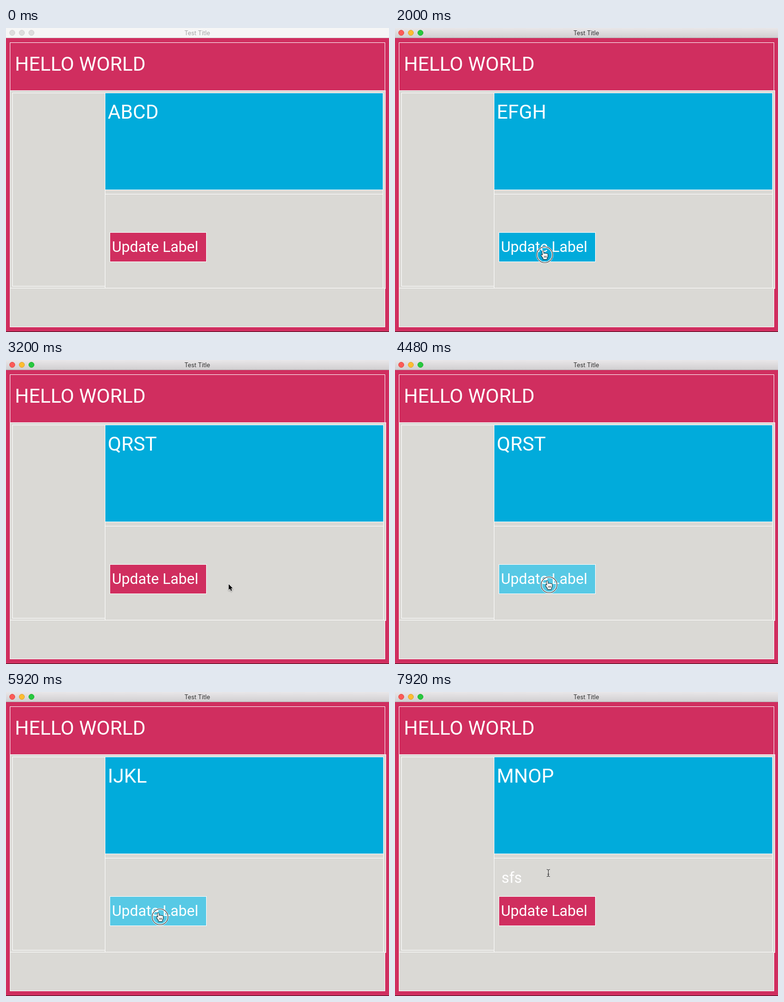
Write an HTML page with a canvas that moves like this. It is 798x634 px and loops after 8 s.

```html
<!DOCTYPE html>
<html lang="en">
<head>
<meta charset="utf-8">
<title>Test Title</title>
<style>
html, body { margin: 0; height: 100%; overflow: hidden; }
canvas { display: block; }
</style>
</head>
<body>
<canvas id="stage" width="798" height="634"></canvas>
<script>
const ctx = document.getElementById('stage').getContext('2d');
const LOOP = 8000, STEP = 80, HOLD = 2 * STEP, APPEAR = 240, FOCUS = 1040, EDIT = 6560;
const PINK = '#d02e5f', GRAY = '#dad9d5', BLUE = '#01abdb', LIGHT = '#57c9e5';
const ALPHABET = 'ABCDEFGHIJKLMNOPQRSTUVWX';

// Mouse releases on the button and elsewhere; each is held for HOLD ms before.
const updates = [1600, 2160, 2480, 2880, 4560, 4880, 5200, 5600, 6000];
const otherClicks = [1360, 7040];
const typed = [7440, 7760, 7920];

// Pointer moves: from, until, then the place reached.
const moves = [
  [APPEAR, 800, 306, 473],
  [1680, 1840, 312, 473],
  [2880, 3280, 502, 466],
  [3440, 3680, 350, 466],
  [3680, 3920, 479, 467],
  [4000, 4240, 321, 469],
  [6080, 6400, 555, 420],
  [6400, 6720, 319.5, 377.5]
];

function pointerAt(t) {
  let x = 306, y = 477;
  for (const [from, until, toX, toY] of moves) {
    const k = Math.min(1, Math.max(0, (t - from) / (until - from)));
    x += (toX - x) * k;
    y += (toY - y) * k;
  }
  return [x, y];
}

function overButton(t) {
  const [x, y] = pointerAt(t);
  return t >= FOCUS - STEP && x > 216 && x < 418 && y > 426 && y < 488;
}

const done = (times, t) => times.filter(time => t >= time).length;
const held = (times, t, span) => times.some(up => t < up && t >= up - span);

function box(x0, y0, x1, y1, fill) {
  if (fill) {
    ctx.fillStyle = fill;
    ctx.fillRect(x0, y0, x1 - x0 + 1, y1 - y0 + 1);
  }
  ctx.strokeStyle = '#fff';
  ctx.lineWidth = 1;
  ctx.strokeRect(x0 + .5, y0 + .5, x1 - x0, y1 - y0);
}

function text(str, x, y, size, color = '#fff', family = 'Roboto') {
  ctx.font = `${size}px ${family}, sans-serif`;
  ctx.fillStyle = color;
  ctx.fillText(str, x, y);
}

function dot(x, y, r, fill, stroke, width = 1) {
  ctx.beginPath();
  ctx.arc(x, y, r, 0, 7);
  if (fill) { ctx.fillStyle = fill; ctx.fill(); }
  ctx.strokeStyle = stroke;
  ctx.lineWidth = width;
  ctx.stroke();
}

function titleBar(active) {
  const g = ctx.createLinearGradient(0, 0, 0, 20);
  g.addColorStop(0, active ? '#e9e7e9' : '#f6f6f6');
  g.addColorStop(1, active ? '#d1cfd1' : '#f6f6f6');
  ctx.fillStyle = g;
  ctx.fillRect(0, 0, 798, 20);
  ctx.fillStyle = active ? '#b3b0b2' : '#d6d4d5';
  ctx.fillRect(0, 20, 798, 1);
  const lights = active
    ? [['#fc5b57', '#df4744'], ['#fdbd30', '#dea034'], ['#27c93f', '#1dad2b']]
    : Array(3).fill(['#dddddd', '#cfcfcf']);
  lights.forEach(([fill, edge], i) => dot(13 + 20 * i, 10, 5.5, fill, edge));
  ctx.textAlign = 'center';
  text('Test Title', 398.5, 15, 12.4, active ? '#303030' : '#a5a5a5', 'Inter');
  ctx.textAlign = 'left';
}

const arrow = new Path2D('M0 0V12.2L2.7 9.7L4.7 14L6.8 13L4.9 8.8H8.6Z');
const hand = new Path2D('M-2.6 1V-6.5C-2.6 -8.6 -5.4 -8.6 -5.2 -6.5L-4 1.5L-5.6 .2' +
  'C-7 -.6 -7.6 .8 -6.6 2L-3 7V9H4.4V7L6 3.5V-1.2C6 -2.6 4 -2.6 3.7 -1.4' +
  'C3.6 -3 1.4 -3 1.2 -1.8C.9 -3.4 -1.1 -3.4 -1.2 -2.2L-2.6 -3');
const fingers = new Path2D('M-1 2V6M1.2 2V6M3.3 2V6');
const beam = new Path2D('M-3.5 -7.5Q0 -7.5 0 -5V5Q0 7.5 -3.5 7.5M3.5 -7.5Q0 -7.5 0 -5V5Q0 7.5 3.5 7.5M-2 2.5H2');

function outline(shape, color, width) {
  ctx.strokeStyle = color;
  ctx.lineWidth = width;
  ctx.stroke(shape);
}

function pointer(t) {
  ctx.save();
  ctx.translate(...pointerAt(t));
  ctx.lineJoin = 'round';
  if (held([...updates, ...otherClicks], t, HOLD)) {
    dot(0, 0, 16.2, null, '#fff', 3.4);
    dot(0, 0, 16.5, null, '#1a1a1a', 1.1);
  }
  if (t >= EDIT) {
    outline(beam, 'rgba(255,255,255,.5)', 2.4);
    outline(beam, '#222', 1.1);
  } else {
    const isHand = overButton(t), shape = isHand ? hand : arrow;
    ctx.shadowColor = 'rgba(0,0,0,.35)';
    ctx.shadowBlur = 3;
    ctx.shadowOffsetY = 1.5;
    outline(shape, isHand ? '#111' : '#fff', 1.6);
    ctx.shadowColor = 'transparent';
    ctx.fillStyle = isHand ? '#fff' : '#000';
    ctx.fill(shape);
    if (isHand) outline(fingers, '#222', .9);
  }
  ctx.restore();
}

function draw(t) {
  const count = done(updates, t), first = count * 4 % ALPHABET.length;
  const right = count ? 786 : 785; // the layout widens after the first update
  const hover = overButton(t - STEP); // the button reacts one step late

  ctx.fillStyle = PINK;
  ctx.fillRect(0, 0, 798, 634);
  ctx.fillStyle = '#2a1118';
  ctx.fillRect(0, 633, 798, 1);
  titleBar(t >= FOCUS);

  box(8, 30, 789, 130);
  box(8, 130, right + 5, 543, GRAY);
  box(8, 542, 789, 623, GRAY);
  box(13, 135, 206, 538);
  box(206, 135, right, 542);
  box(206, 135, right, 337, BLUE);
  box(206, 346, right, 542);
  box(216, 426, 417, 487, held(updates, t, STEP) ? LIGHT : hover ? BLUE : PINK);

  text('HELLO WORLD', 18.4, 89, 41);
  text(ALPHABET.slice(first, first + 4), 212, 189, 41);
  text('Update Label', 220.8, 467, 30.8);
  text('sfs'.slice(0, done(typed, t)), 222, 398, 30.8);
  if (t >= APPEAR) pointer(t);
}

const start = performance.now();
function tick() {
  const t = (performance.now() - start) % LOOP;
  draw(Math.floor(t / STEP) * STEP);
  requestAnimationFrame(tick);
}
tick();
</script>
</body>
</html>
```
